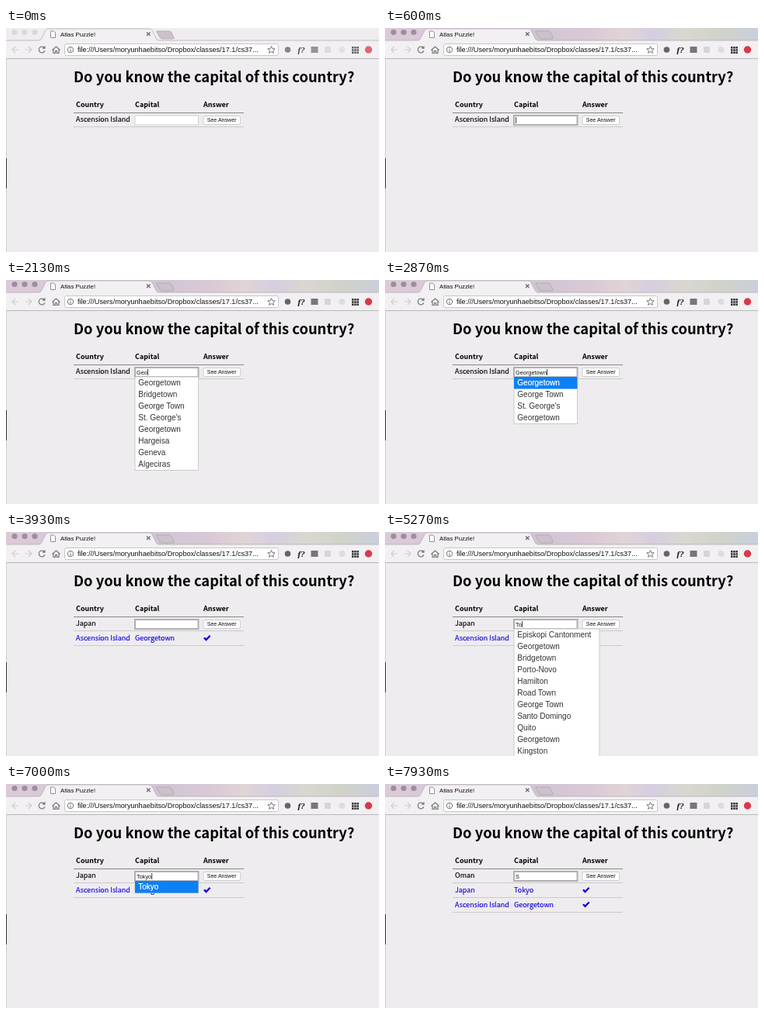
An HTML page for the animation above (8 s loop, 480 by 289 pixels).

```html
<!DOCTYPE html>
<html lang="en">
<head>
<meta charset="utf-8">
<title>Atlas Puzzle!</title>
<style>
html, body { margin: 0; width: 100%; height: 100%; overflow: hidden; background: #eeecee; }
svg { display: block; }
text { font-family: "Liberation Sans", Arial, sans-serif; fill: #111; white-space: pre; }
.page { font: 8.97px "Noto Sans CJK KR", "Noto Sans CJK JP", "Noto Sans CJK", sans-serif; fill: #000; }
.row { stroke: #000; stroke-width: .15; }
.bold { font-weight: 700; }
.title { font-size: 18.35px; font-weight: 700; }
.done { fill: #1000e0; stroke: #1000e0; }
.field { font-size: 7.35px; }
.menu { font-size: 10px; fill: #333; }
.picked { fill: #fff; stroke: #fff; stroke-width: .2; }
.line { fill: none; stroke-width: 1.2; }
</style>
</head>
<body>
<svg width="480" height="289" viewBox="0 0 480 289">
  <defs>
    <linearGradient id="theme">
      <stop offset="0" stop-color="#dccad9"/><stop offset=".42" stop-color="#d1c5d5"/>
      <stop offset=".55" stop-color="#d9c9d6"/><stop offset=".64" stop-color="#e0d4d6"/>
      <stop offset=".72" stop-color="#d5cee0"/><stop offset=".8" stop-color="#dad7d0"/>
      <stop offset=".9" stop-color="#d0d3c9"/><stop offset="1" stop-color="#c9cfdc"/>
    </linearGradient>
  </defs>
  <rect width="480" height="289" fill="#eeecee"/>

  <!-- tab strip -->
  <rect width="480" height="16" fill="#f0edf0"/>
  <rect id="strip" width="480" height="16" fill="url(#theme)"/>
  <g id="lights"><circle cx="11" cy="5.5" r="3.6"/><circle cx="24" cy="5.5" r="3.6"/><circle cx="37" cy="5.5" r="3.6"/></g>
  <path d="M194 4H210q2 0 3 2l3 6q1 2-2 2H201q-2 0-3-2l-4-7z" fill="#cbc2ca" stroke="#aaa2aa" stroke-width=".7"/>
  <rect y="16" width="480" height="23" fill="#f2f0f2"/>
  <path d="M0 16H42q3 0 4-3l5-10q1-2 4-2H184q3 0 4 2l5 10q1 3 4 3H480" fill="#f2f0f2" stroke="#b4abb4" stroke-width=".8"/>
  <path d="M57.5 4h4l2 2v6.5h-6z" fill="#fff" stroke="#777" stroke-width=".8"/>
  <text x="70" y="11" font-size="7.8">Atlas Puzzle!</text>
  <path d="M181 5.5l4.500 4.500m0-4.500l-4.500 4.500" class="line" stroke="#666"/>

  <!-- toolbar -->
  <path d="M16 28h-8m4-4l-4 4l4 4" class="line" stroke="#d0ced0"/>
  <path d="M25 28h8m-4-4l4 4l-4 4" class="line" stroke="#d0ced0"/>
  <path d="M49.500 25.800a3.900 3.900 0 1 0 .4 3.400M50 23.200v3h-3" class="line" stroke="#777"/>
  <path d="M59.500 28.500l5-4.500l5 4.500M61 28v4.500h2.500v-3h2v3h2.500v-4.500" class="line" stroke="#777"/>
  <rect x="75.500" y="20.500" width="275" height="15" rx="2" fill="#fff" stroke="#c9c5c9"/>
  <circle cx="83" cy="28" r="3.700" fill="none" stroke="#666" stroke-width=".9"/>
  <path d="M83 25.500v1.200m0 1v2.800" stroke="#666"/>
  <text x="92" y="31.300" font-size="9.150">file:///Users/moryunhaebitso/Dropbox/classes/17.1/cs37...</text>
  <path d="M341.500 23.500l1.300 3.100l3.400.300l-2.600 2.200l.8 3.300l-2.900-1.800l-2.900 1.800l.8-3.300l-2.600-2.200l3.400-.300z" fill="none" stroke="#666" stroke-width=".9"/>
  <g id="icons">
    <circle cx="362.500" cy="28" r="3.800" fill="#656565"/>
    <text x="375.500" y="32" style="font:italic 700 11px 'Liberation Serif',serif">f?</text>
    <rect x="392.500" y="24" width="9" height="8" fill="#777"/>
    <rect x="410" y="24" width="8" height="8" fill="#d8d5d8"/>
    <circle cx="432.500" cy="28" r="4" fill="#dfdcdf"/>
    <path d="M445 25.300h9m-9 3.200h9m-9 3.200h9" stroke="#333" stroke-width="2.500" stroke-dasharray="2.500 .7"/>
    <circle cx="466.500" cy="28" r="4.700" fill="#d8394a"/>
  </g>
  <path d="M0 39.500H480" stroke="#b9b6b9"/>
  <path d="M.5 40V289" stroke="#cfcccf"/>
  <path d="M.5 168V207" stroke="#333"/>

  <!-- page -->
  <text class="page title" x="87" y="70">Do you know the capital of this country?</text>
  <text class="page bold" x="90" y="102">Country</text>
  <text class="page bold" x="166" y="102">Capital</text>
  <text class="page bold" x="254" y="102">Answer</text>
  <path d="M87 109.500H306" stroke="#8a888a"/>
  <path d="M87 127.500H306" stroke="#cbc9cb"/>
  <text id="country" class="page row" x="90" y="121"></text>
  <rect x="254" y="113.500" width="47.500" height="11" rx="2" fill="#fff" stroke="#c4c2c4" stroke-width=".8"/>
  <text x="258.700" y="121.300" font-size="7.1">See Answer</text>
  <g id="rows"></g>
  <rect id="box" x="166" y="113" width="81.500" height="12" fill="#fff"/>
  <text id="field" class="field" x="168" y="121.500"></text>
  <rect id="caret" y="115" width=".8" height="8" fill="#111"/>
  <g id="menu"></g>
</svg>
<script>
const LOOP = 8000, BLINK = 500;
const el = id => document.getElementById(id);
const set = (id, attrs) => Object.entries(attrs).forEach(([k, v]) => el(id).setAttribute(k, v));
const quiz = [['Ascension Island', 'Georgetown'], ['Japan', 'Tokyo'], ['Oman', 'Muscat']];
const menus = {
  ge: ['Georgetown', 'Bridgetown', 'George Town', "St. George's", 'Georgetown', 'Hargeisa', 'Geneva', 'Algeciras'],
  geo: ['Georgetown', 'George Town', "St. George's", 'Georgetown'],
  to: ['Episkopi Cantonment', 'Georgetown', 'Bridgetown', 'Porto-Novo', 'Hamilton', 'Road Town',
    'George Town', 'Santo Domingo', 'Quito', 'Georgetown', 'Kingston', 'Castries'],
  tok: ['Tokyo']
};

// time, field text (null = window not active), answered rows, open menu, first item picked
const steps = [
  [0, null, 0], [470, '', 0], [1130, 'G', 0], [1400, 'Ge', 0], [1700, 'Ge', 0, 'ge'],
  [1930, 'Geo', 0, 'ge'], [2230, 'Geo', 0, 'geo'], [2670, 'Georgetown', 0, 'geo', true],
  [3400, '', 1], [4600, 'T', 1], [4800, 'To', 1], [5100, 'To', 1, 'to'],
  [6130, 'Tok', 1, 'to'], [6430, 'Tok', 1, 'tok'], [6800, 'Tokyo', 1, 'tok', true],
  [7070, '', 2], [7400, 'S', 2]
];

const label = (cls, x, y, s) => `<text class="${cls}" x="${x}" y="${y}">${s}</text>`;

function rowMarkup([country, capital], i) {
  const y = 140 + i * 18.8;
  return label('page row done', 90, y, country) + label('page row done', 166, y, capital) +
    `<path d="M255 ${y - 3.6}l2.600 2.700l5-5.400" fill="none" stroke="#1000e0" stroke-width="2.300"/>` +
    `<path d="M87 ${Math.round(y + 6) + .5}H306" stroke="#cbc9cb"/>`;
}

function menuMarkup(name, picked) {
  if (!name) return '';
  const items = menus[name], width = name === 'to' ? 110 : 81.5;
  return `<rect x="166" y="125" width="${width}" height="${items.length * 15 + .5}" fill="#fff" stroke="#c8c6c8" stroke-width=".9"/>` +
    (picked ? `<rect x="166" y="125" width="${width}" height="15.500" fill="#0c80f5"/>` : '') +
    items.map((s, i) => label(picked && !i ? 'menu picked' : 'menu', 170.3, 136 + i * 15, s)).join('');
}

function show([, text, done, menu, picked]) {
  const active = text !== null;
  set('strip', { visibility: active ? 'visible' : 'hidden' });
  set('lights', { fill: active ? '#9c8f9c' : '#dbd8db' });
  set('icons', { opacity: active ? 1 : .75 });
  set('box', { stroke: active ? '#b0aeb0' : '#d4d2d4', 'stroke-width': active ? 2 : 1 });
  el('country').textContent = quiz[done][0];
  el('rows').innerHTML = quiz.slice(0, done).reverse().map(rowMarkup).join('');
  el('field').textContent = text || '';
  set('caret', { x: 168.2 + (text ? el('field').getComputedTextLength() : 0) });
  el('menu').innerHTML = menuMarkup(menu, picked);
}

let current;
function frame() {
  const t = performance.now() % LOOP;
  let step = steps[0], typed = 0;
  for (const next of steps) {
    if (next[0] > t) break;
    if (next[1] !== step[1]) typed = next[0];
    step = next;
  }
  if (step !== current) show(current = step);
  const lit = step[1] !== null && Math.floor((t - typed) / BLINK) % 2 === 0;
  set('caret', { visibility: lit ? 'visible' : 'hidden' });
  requestAnimationFrame(frame);
}
frame();
</script>
</body>
</html>
```
